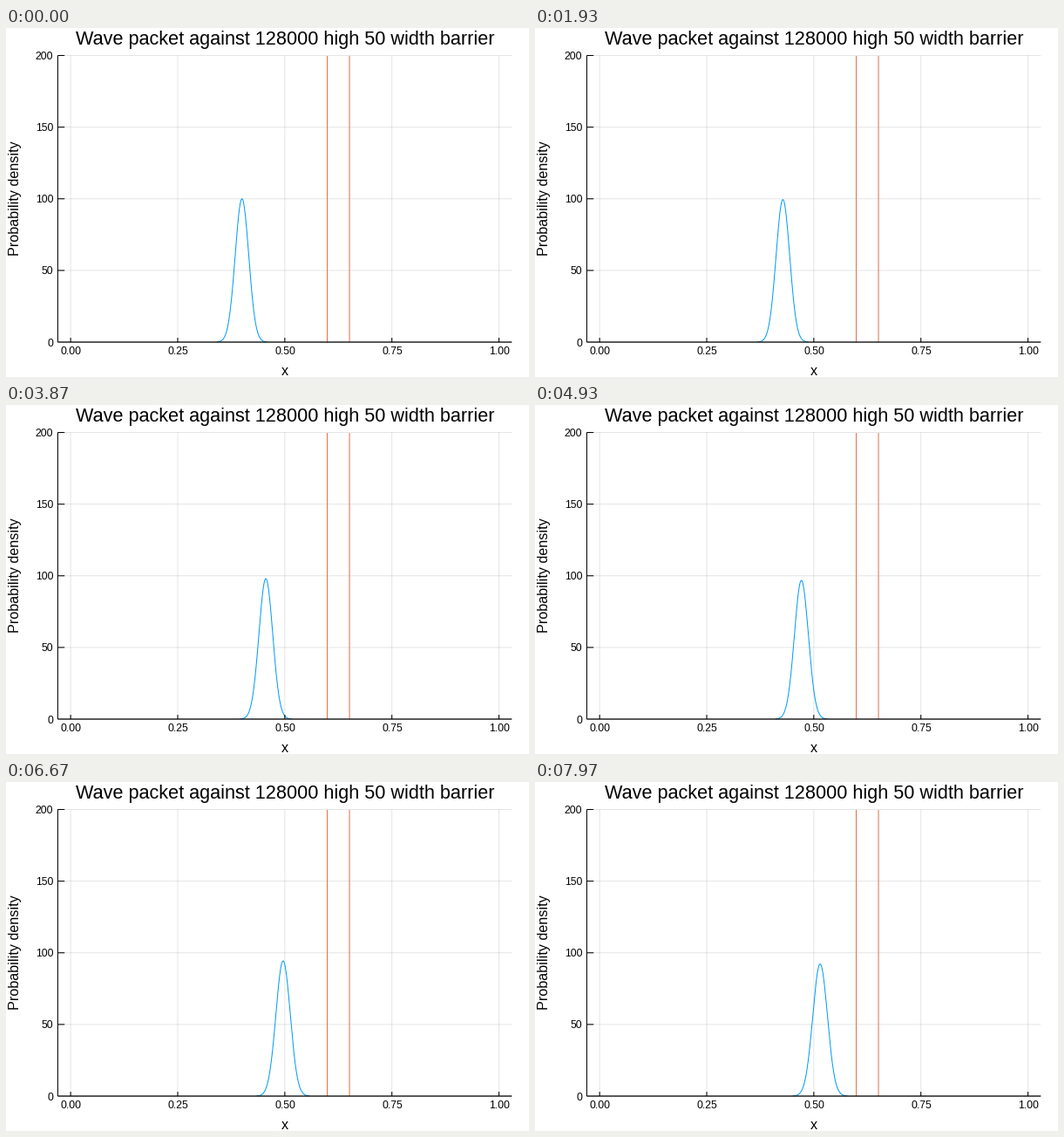
A matplotlib script for the animation above (8 s loop, 600x400 px).

```python
import numpy as np
import matplotlib.pyplot as plt
from matplotlib.animation import FuncAnimation

W, H, DPI = 600, 400, 100
LEFT, RIGHT, TOP, BOTTOM = 59.4, 580.3, 31.5, 360.0
FRAMES, INTERVAL = 400, 20
STEPS_PER_MS = 0.03

# free Gaussian packet: drifts at constant speed while it spreads
X0, SIGMA, PEAK = 0.4, 0.0158, 100
SPEED = 0.00048
SPREAD_STEPS = 570

BLUE, ORANGE = "#009afa", "#e26f46"
PX = 72 / DPI

plt.rcParams["font.family"] = "Liberation Sans"
fig = plt.figure(figsize=(W / DPI, H / DPI), dpi=DPI, facecolor="white")
ax = fig.add_axes([LEFT / W, 1 - BOTTOM / H, (RIGHT - LEFT) / W, (BOTTOM - TOP) / H])
ax.set_xlim(-0.03, 1.03)
ax.set_ylim(0, 200)
ax.axis("off")


def line(xs, ys, color, width=1.0, **kw):
    return ax.plot(xs, ys, color=color, lw=width * PX, snap=False, **kw)[0]


def label(x, y, text, size, ha="center", **kw):
    fig.text(x / W, 1 - y / H, text, fontsize=size * PX, ha=ha, va="baseline", **kw)


def grid_line(xs, ys):
    line(xs, ys, "black", alpha=0.1, zorder=1, clip_on=False, solid_capstyle="butt")


def axis_line(xs, ys, width=1.05):
    line(xs, ys, "black", width, zorder=5, clip_on=False, solid_capstyle="butt")


x_min, x_max = ax.get_xlim()
x_tick = 0.015 * 200
y_tick = 0.015 * (x_max - x_min)

for v in np.linspace(0, 1, 5):
    grid_line([v, v], [0, 200])
    axis_line([v, v], [0, x_tick])
    px = LEFT + (v - x_min) / (x_max - x_min) * (RIGHT - LEFT)
    label(px + 0.4, 374.4, f"{v:.2f}", 12.1)

for v in range(0, 201, 50):
    if v:
        grid_line([x_min, x_max], [v, v])
        axis_line([x_min, x_min + y_tick], [v, v])
    py = BOTTOM - v / 200 * (BOTTOM - TOP)
    label(54.4, py + 4.6, str(v), 12.1, ha="right")

axis_line([x_min, x_max], [0, 0], 1.3)
axis_line([x_min, x_min], [0, 200])

label(320, 18.8, "Wave packet against 128000 high 50 width barrier", 21.6)
label(320, 398.2, "x", 16.1)
label(14.8, 195.5, "Probability density", 16.1, rotation=90, rotation_mode="anchor")

for wall in (0.599, 0.651):
    line([wall, wall], [0, 200], ORANGE, zorder=4)

x = np.linspace(0, 1, 1001)
packet = line(x, 0 * x, BLUE, zorder=3)


def density(step):
    spread = np.hypot(1, step / SPREAD_STEPS)
    u = (x - X0 - SPEED * step) / (SIGMA * spread)
    return PEAK / spread * np.exp(-u * u / 2)


def update(i):
    # the simulation advances 30 steps per second
    step = int((i * INTERVAL + 14) * STEPS_PER_MS)
    d = density(min(step, 239))
    # the flat tails vanish into the black axis
    packet.set_ydata(np.where(d > 0.1, d, np.nan))
    return (packet,)


anim = FuncAnimation(fig, update, frames=FRAMES, interval=INTERVAL,
                     init_func=lambda: update(0), repeat=True, repeat_delay=0)
plt.show()
```
